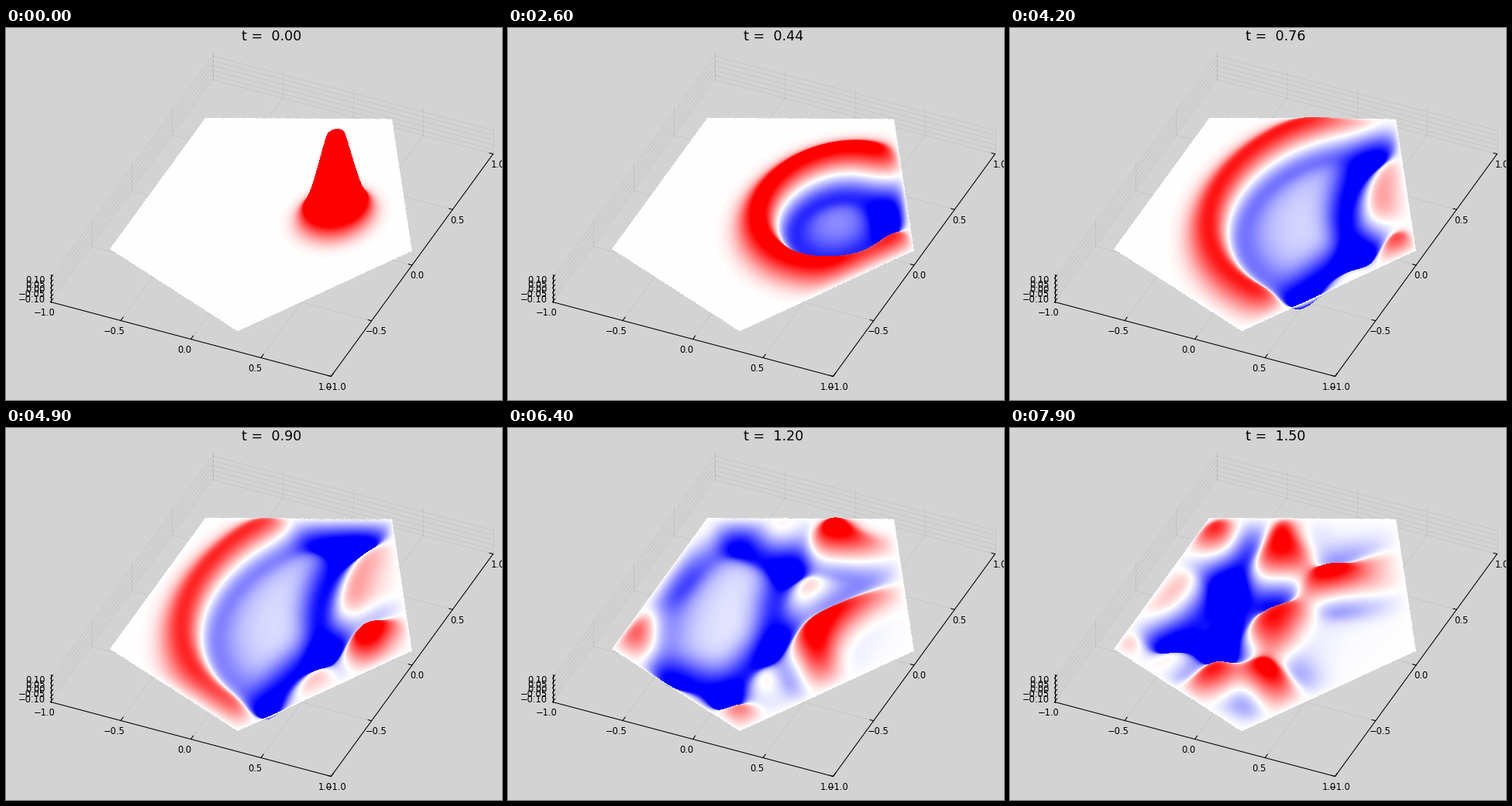
Animation, 640 px wide and 480 px high, one loop 8 s. Source, as a matplotlib script:

```python
import numpy as np
import matplotlib.pyplot as plt
from matplotlib.animation import FuncAnimation

W, H = 640, 480
DT = 0.02            # model time per frame
HOLD = 4             # extra frames on the first state
FRAMES = 80
N, STEPS = 401, 8    # grid nodes per side, solver steps per frame
CLIM = 0.14          # height at which colours saturate
LIFT = 124           # pixels per unit of height
CUT = 0.85           # the view box cuts off anything higher

# Oblique view: screen = ORIGIN + x * EX + y * EY, with heights going up
ORIGIN = np.array([342.5, 239.5])
EX = np.array([181.0, 48.0])
EY = np.array([104.5, -143.5])
Z_HALF, Z_STEP = 18.0, 6.2
TICKS = np.linspace(-1, 1, 5)


def inside(x, y):
    """True within the regular pentagon of radius 1 with a corner at (1, 0)."""
    ok = np.ones(np.shape(x), bool)
    for i in range(5):
        a = np.pi * (2 * i + 1) / 5
        ok &= x * np.cos(a) + y * np.sin(a) < np.cos(np.pi / 5)
    return ok


def solve_wave():
    """Wave equation with fixed edges, released from a Gaussian bump."""
    g = np.linspace(-1, 1, N)
    x, y = np.meshgrid(g, g)
    mask = inside(x, y)
    u = np.exp(-50 * ((x - 0.4) ** 2 + (y - 0.1) ** 2)) * mask
    c = (DT / STEPS / (g[1] - g[0])) ** 2
    core = mask[1:-1, 1:-1] * c

    def push(f):
        out = np.zeros_like(f)
        out[1:-1, 1:-1] = core * (f[2:, 1:-1] + f[:-2, 1:-1] + f[1:-1, 2:]
                                  + f[1:-1, :-2] - 4 * f[1:-1, 1:-1])
        return out

    prev = u + push(u) / 2
    states = [u.astype(np.float32).ravel()]
    for _ in range(FRAMES - HOLD - 1):
        for _ in range(STEPS):
            prev, u = u, 2 * u - prev + push(u)
        states.append(u.astype(np.float32).ravel())
    return states


def sample_points():
    """Dense points of the sheet, ordered from back to front."""
    v, col = np.meshgrid(np.arange(110, 396, 0.15), np.arange(130, 530),
                         indexing="ij")
    inv = np.linalg.inv(np.column_stack([EX, EY]))
    du, dv = col + 0.5 - ORIGIN[0], v - ORIGIN[1]
    x = inv[0, 0] * du + inv[0, 1] * dv
    y = inv[1, 0] * du + inv[1, 1] * dv
    # whole grid cells are kept or dropped, which leaves a stepped rim
    keep = inside((np.floor(x * 200) + 0.5) / 200,
                  (np.floor(y * 200) + 0.5) / 200)
    keep &= (abs(x) < 1) & (abs(y) < 1)
    return x[keep], y[keep], v[keep].astype(np.float32), col[keep]


states = solve_wave()
px, py, pv, pcol = sample_points()
gx, gy = (px + 1) * (N - 1) / 2, (py + 1) * (N - 1) / 2
ix, iy = gx.astype(int), gy.astype(int)
fx, fy = (gx - ix).astype(np.float32), (gy - iy).astype(np.float32)
node = iy * N + ix
corners = [(node, (1 - fx) * (1 - fy)), (node + 1, fx * (1 - fy)),
           (node + N, (1 - fx) * fy), (node + N + 1, fx * fy)]
palette = (plt.get_cmap("bwr")(np.arange(256)) * 255).round().astype(np.uint8)


def render(state):
    z = sum(state[i] * w for i, w in corners)
    row = np.clip(pv - LIFT * z, 0, H - 1).astype(int)
    shade = np.clip((z / CLIM + 1) * 127.5, 0, 255).astype(np.uint8)
    low = z < CUT
    pixels = np.zeros((H, W, 4), np.uint8)
    pixels[row[low], pcol[low]] = palette[shade[low]]
    return pixels


def spot(x, y, h=0):
    """Screen place of (x, y), h pixels above the floor of the box."""
    return ORIGIN + x * EX + y * EY + [0.5, Z_HALF + 0.5 - h]


plt.rcParams["font.family"] = "DejaVu Sans"
fig = plt.figure(figsize=(W / 100, H / 100), dpi=100, facecolor="lightgray")
ax = fig.add_axes([0, 0, 1, 1])
ax.set_xlim(0, W)
ax.set_ylim(H, 0)
ax.axis("off")


def line(p, q, color="black", width=0.75, z=3):
    ax.plot([p[0], q[0]], [p[1], q[1]], color=color, lw=width, zorder=z)


def grid(p, q):
    line(p, q, (0, 0, 0, 0.1), 0.4, 1)


def label(p, value, fmt="{:.1f}", ha="center"):
    text = fmt.format(value).replace("-", "\u2212")
    ax.text(p[0], p[1], text, fontsize=8.3, ha=ha, va="center_baseline",
            zorder=4)


tick_x, tick_y = EY * 0.03, -EX * 0.025
top = 2 * Z_HALF
for t in TICKS:
    grid(spot(t, -1), spot(t, 1))
    grid(spot(-1, t), spot(1, t))
    grid(spot(t, 1), spot(t, 1, top))
    grid(spot(-1, t), spot(-1, t, top))
    a, b = spot(t, -1), spot(1, t)
    line(a, a + tick_x)
    line(b, b + tick_y)
    label(a + [-8, 12.4], t)
    label(b + [6, 12.4], t)
for n in range(-2, 3):
    h = Z_HALF + n * Z_STEP
    grid(spot(-1, -1, h), spot(-1, 1, h))
    grid(spot(-1, 1, h), spot(1, 1, h))
    a = spot(-1, -1, h)
    line(a, a + tick_x)
    label(a + [-6.7, 0.7], n * 0.05, "{:.2f}", "right")
line(spot(-1, -1), spot(1, -1))
line(spot(1, -1), spot(1, 1))
line(spot(-1, -1), spot(-1, -1, top))

sheet = ax.imshow(render(states[0]), extent=(0, W, H, 0), aspect="auto",
                  interpolation="nearest", zorder=2)
title = ax.text(342.5, 16, "", fontsize=12.6, ha="center", va="baseline")


def draw(i):
    k = max(0, i - HOLD)
    sheet.set_data(render(states[k]))
    title.set_text(f"t =  {k * DT:.2f}")
    return sheet, title


anim = FuncAnimation(fig, draw, frames=FRAMES, interval=100, repeat=True,
                     repeat_delay=0, blit=False)
plt.show()
```
